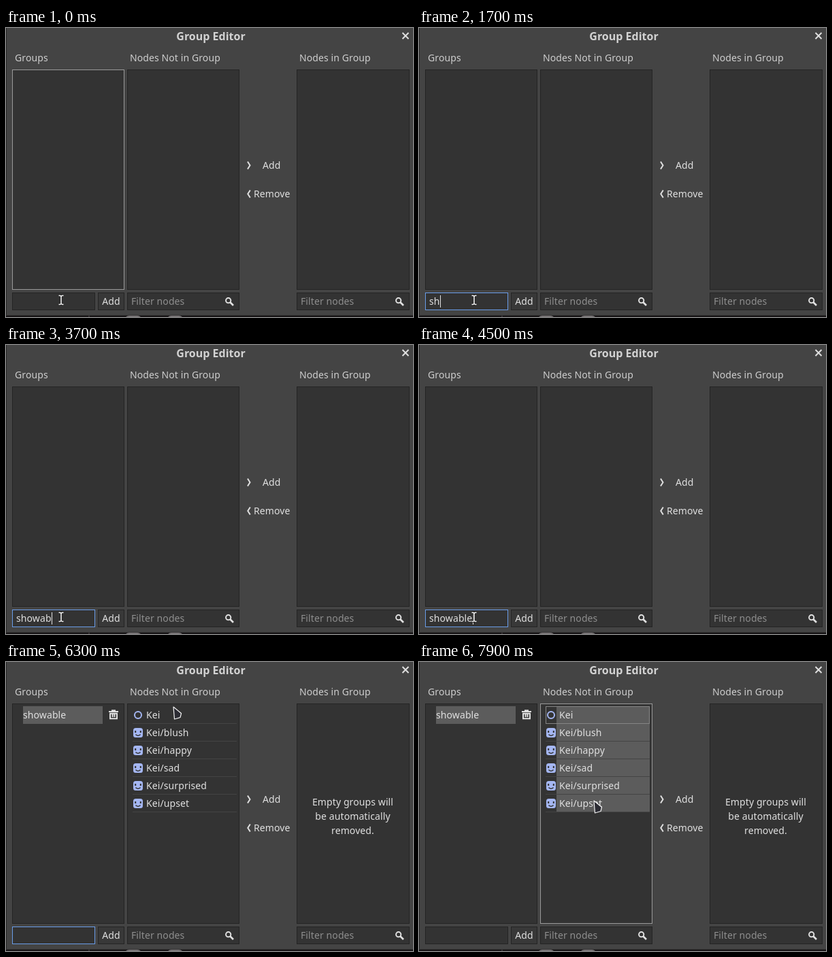
An HTML page that plays this animation: 598 by 425 pixels, repeating every 8000 ms.

```html
<!DOCTYPE html>
<html lang="en">
<head>
<meta charset="utf-8">
<title>Group Editor</title>
<style>
  html, body { margin: 0; width: 100%; height: 100%; overflow: hidden; background: #444; }
  svg { display: block; }
  text { font: 14px "Noto Sans", sans-serif; letter-spacing: .1px; fill: #e0e0e0; white-space: pre; }
  .title { font-weight: 700; font-size: 16px; letter-spacing: 0; fill: #d2d2d2; }
  .label { fill: #cecece; }
  .hint { fill: #8e8e8e; }
  .mid { text-anchor: middle; }
  .box { fill: #333; stroke: #242424; }
  .box.lit { stroke: #999; }
  .field.lit { stroke: #699ce8; }
  .button { fill: #383838; }
  .icon { fill: none; stroke: #e0e0e0; stroke-width: 2; }
  .pick { fill: #5c5c5c; }
  .rule { stroke: #444; }
</style>
</head>
<body>
<svg width="598" height="425" viewBox="0 0 598 425">
  <defs>
    <g id="lens" class="icon">
      <circle cx="4.7" cy="4.7" r="3.6"/>
      <path d="M7.5 7.5L12 12" stroke-width="2.6"/>
    </g>
    <g id="face">
      <rect width="14" height="14" rx="3.5" fill="#a5b7f3"/>
      <path d="M3.2 4v3M10.8 4v3" stroke="#333" stroke-width="2"/>
      <path d="M3.5 9.5Q7 13 10.5 9.5" fill="none" stroke="#333" stroke-width="1.5"/>
    </g>
  </defs>

  <rect width="598" height="425" fill="#444"/>
  <rect width="1" height="425" fill="#262626"/>
  <rect y="422" width="598" height="1" fill="#343434"/>
  <rect y="423" width="598" height="2" fill="#171416"/>
  <g fill="#787476">
    <path d="M176 425Q178 423 181 423H193Q196 423 198 425ZM238 425Q240 423 243 423H254Q257 423 259 425Z"/>
    <rect x="121" y="423" width="2" height="2" fill="#353033"/>
  </g>

  <text class="title mid" x="301" y="18">Group Editor</text>
  <path class="icon" d="M582.5 7L591.5 16M591.5 7L582.5 16"/>
  <text class="label" x="13" y="49">Groups</text>
  <text class="label" x="182" y="49">Nodes Not in Group</text>
  <text class="label" x="431" y="49">Nodes in Group</text>

  <rect class="box" id="groups" x="9.5" y="61.5" width="164" height="323"/>
  <rect class="box" id="nodes" x="178.5" y="61.5" width="164" height="323"/>
  <rect class="box" x="427.5" y="61.5" width="165" height="323"/>

  <path class="icon" d="M355 196.5L358.5 202L355 207.5M358.8 238.5L355.3 244L358.8 249.5"/>
  <text x="377" y="207">Add</text>
  <text x="364" y="249">Remove</text>

  <rect class="box field" id="field" x="9.5" y="389.5" width="121" height="25"/>
  <text id="typed" x="15" y="407"></text>
  <rect id="caret" y="393" width="1" height="18" fill="#e0e0e0"/>
  <rect class="box button" x="135.5" y="389.5" width="38" height="25"/>
  <text class="mid" x="154.5" y="407">Add</text>
  <rect class="box" x="178.5" y="389.5" width="164" height="25"/>
  <text class="hint" x="184" y="407">Filter nodes</text>
  <use href="#lens" x="322" y="396"/>
  <rect class="box" x="427.5" y="389.5" width="165" height="25"/>
  <text class="hint" x="433" y="407">Filter nodes</text>
  <use href="#lens" x="572" y="396"/>

  <g id="filled">
    <rect class="pick" x="25" y="65" width="117" height="26"/>
    <text x="25" y="83">showable</text>
    <path class="icon" d="M151 73H165M155 71.2H161" stroke-width="1.8"/>
    <path class="icon" d="M153 76V83.2H163V76M156.5 75.5V81M159.5 75.5V81" stroke-width="1.7"/>
    <path class="icon" d="M152 75.8H164" stroke-width="1.2"/>
    <g id="rows"></g>
    <rect id="outline" x="186.5" y="65.5" width="152" height="25" fill="none" stroke="#858585"/>
    <g class="mid">
      <text x="509.5" y="211">Empty groups will</text>
      <text x="509.5" y="232">be automatically</text>
      <text x="509.5" y="253">removed.</text>
    </g>
  </g>

  <g id="beam" fill="none">
    <path d="M77.5 393.5H79.5L81 394.5L82.5 393.5H84.5M81 394.5V405.5M77.5 406.5H79.5L81 405.5L82.5 406.5H84.5" stroke="#222" stroke-width="3.4"/>
    <path d="M77.5 393.5H79.5L81 394.5L82.5 393.5H84.5M81 394.5V405.5M77.5 406.5H79.5L81 405.5L82.5 406.5H84.5" stroke="#fff" stroke-width="1.5"/>
  </g>
  <path id="arrow" d="M0 0L11.5 9.5L10 15.5L1.5 18Z" fill="#2b2b33" stroke="#f2f2f2" stroke-width="1.2" stroke-linejoin="round"/>
</svg>

<script>
const LOOP = 8000, BLINK = 650;
const FOCUS = 500, ENTER = 5100, LEAVE = 5600, CLICK = 6800, RANGE = 7700;
const WORD = 'showable';
const KEYS = [1300, 1600, 2400, 2800, 3300, 3600, 4000, 4300];
// Pointer stops: time, x, y
const PATH = [[5500, 81, 400], [6250, 246, 66], [6500, 246, 66], [6750, 250, 74], [6950, 250, 74], [7600, 257, 204]];

const $ = id => document.getElementById(id);
const show = (el, on) => el.setAttribute('visibility', on ? 'inherit' : 'hidden');
const lit = (id, on) => $(id).classList.toggle('lit', on);

const names = ['', '/blush', '/happy', '/sad', '/surprised', '/upset'];
$('rows').innerHTML = names.map((name, i) => {
  const y = 65 + 26 * i;
  const icon = i ? `<use href="#face" x="187" y="${y + 6}"/>`
    : `<circle cx="194" cy="${y + 13}" r="5" fill="none" stroke="#a5b7f3" stroke-width="2"/>`;
  return `<rect class="pick row" x="202" y="${y}" width="137" height="26"/>
    <path class="rule" d="M186 ${y + 25.5}H339"/>${icon}
    <text x="206" y="${y + 18}">Kei${name}</text>`;
}).join('');
const picks = document.querySelectorAll('.row');

function pointer(t) {
  let i = 1;
  while (i < PATH.length - 1 && t > PATH[i][0]) i++;
  const [t0, x0, y0] = PATH[i - 1], [t1, x1, y1] = PATH[i];
  const p = Math.min(1, Math.max(0, (t - t0) / (t1 - t0)));
  const e = p * p * (3 - 2 * p);
  return [x0 + (x1 - x0) * e, y0 + (y1 - y0) * e];
}

function draw(t) {
  const focused = t >= FOCUS && t < CLICK;
  const count = t < ENTER ? KEYS.filter(k => k <= t).length : 0;
  const typed = $('typed');
  typed.textContent = WORD.slice(0, count);
  const last = Math.max(...[FOCUS, ...KEYS, ENTER].filter(k => k <= t));
  $('caret').setAttribute('x', Math.round(15.3 + (count ? typed.getComputedTextLength() : 0)));
  show($('caret'), focused && Math.floor((t - last) / BLINK) % 2 === 0);

  lit('groups', t < FOCUS);
  lit('field', focused);
  lit('nodes', t >= CLICK);

  show($('filled'), t >= ENTER);
  picks.forEach((row, i) => show(row, t >= (i ? RANGE : CLICK)));
  show($('outline'), t >= CLICK);

  show($('beam'), t < LEAVE);
  show($('arrow'), t >= LEAVE);
  $('arrow').setAttribute('transform', `translate(${pointer(t)})`);
}

const start = performance.now();
function tick() {
  draw((performance.now() - start) % LOOP);
  requestAnimationFrame(tick);
}
tick();
</script>
</body>
</html>
```
